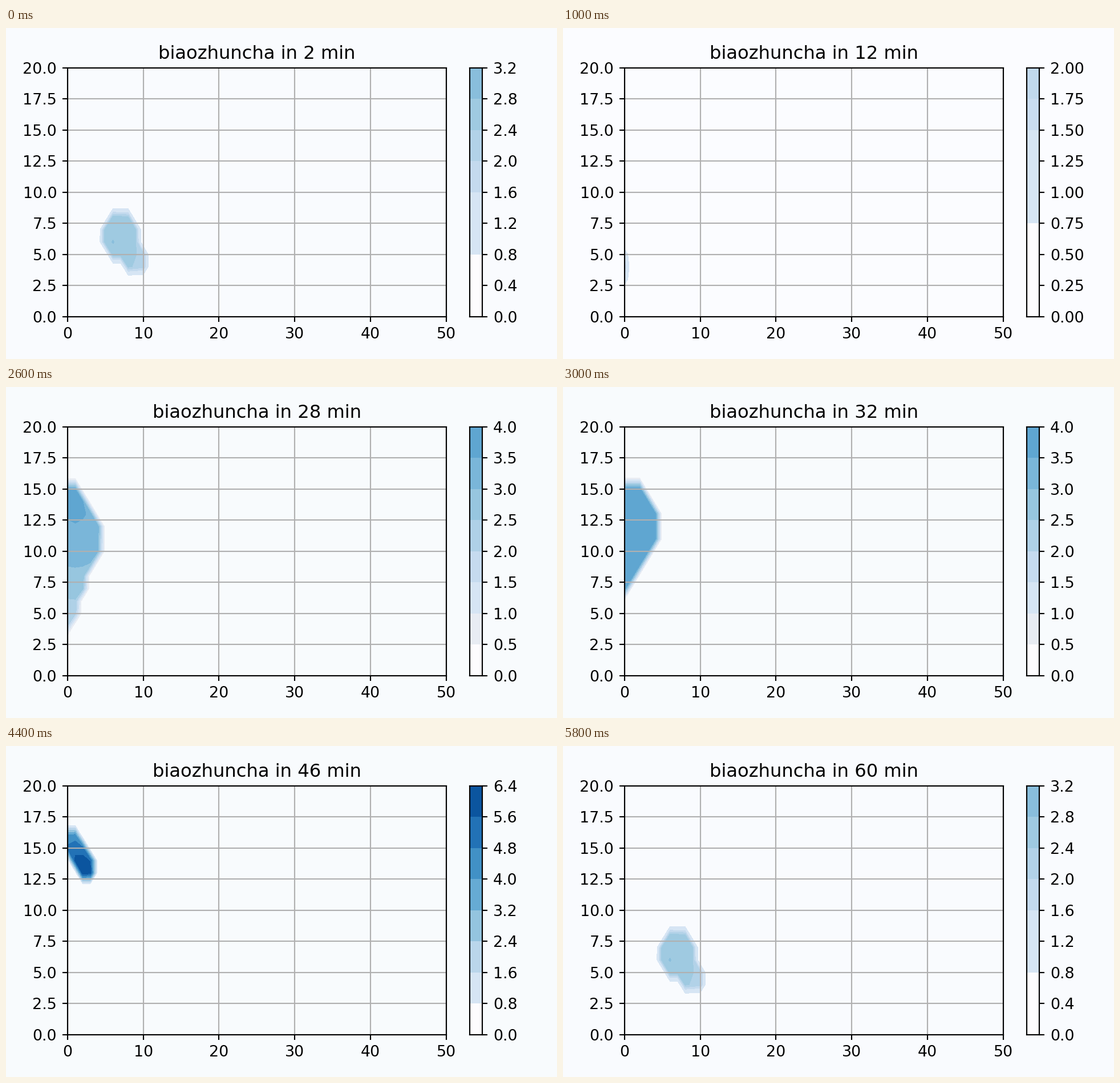
Write a matplotlib script that moves like this. It is 966x580 px and loops after 6000 ms.

```python
import numpy as np
import matplotlib.pyplot as plt
from matplotlib.animation import FuncAnimation
from matplotlib.path import Path
from matplotlib.ticker import MaxNLocator

W, H, DPI = 966, 580, 193.2
FRAMES, INTERVAL = 30, 200
VMAX = 7
blues = plt.get_cmap("Blues")

xs, ys = np.arange(51), np.arange(21)
grid = (xs[None, :] + 1j * ys[:, None]).ravel()


def ring(*corners):
    """Closed outline with an equal share of points on every edge."""
    n = len(corners)
    t = np.arange(360) * n / 360
    return np.interp(t, np.arange(n + 1), corners + corners[:1])


# Each cloud: outline clockwise from top left, hot spot, falloff around it.
start = (ring(6+8j, 8+8j, 9+7j, 9+6j, 10+5j, 10+4j, 8+4j, 6+5j, 5+6j, 5+7j),
         6+6j, 0.025)
wisp = ring(-1+5j, 5j, 4j, 3j, -1+3j), 4j, 0.3
drift = ring(-1+9j, 9j, 2+8j, 2+5j, 3j, -1+3j), 8j, 0.04
tall = (ring(-1+15j, 1+15j, 4+12j, 4+10j, 2+8j, 2+7j, 1+6j, 1+5j, 4j, -1+4j),
        1+14j, 0.014)
wide = (ring(-1+17j, 3+17j, 5+15j, 5+13j, 4+12j, 3+12j, 2+11j, 1+11j, 10j, -1+10j),
        1+14j, -0.019)
dense = ring(16j, 1+16j, 3+14j, 3+13j, 2+13j, 15j), 1.5+12.4j, 0.045

KEYS = [0, 5, 9, 13, 18, 22, 29]
CLOUDS = [start, wisp, drift, tall, wide, dense, start]
PEAK_KEYS = [0, 5, 9, 13, 18, 22, 23, 29]
PEAKS = [2.81, 1.87, 3.05, 3.62, 4.5, 6.3, 6.75, 2.81]


def field(i):
    k = min(np.searchsorted(KEYS, i, side="right") - 1, len(KEYS) - 2)
    u = (i - KEYS[k]) / (KEYS[k + 1] - KEYS[k])
    edge, hot, fall = ((1 - u) * a + u * b for a, b in zip(CLOUDS[k], CLOUDS[k + 1]))

    outline = Path(np.column_stack([edge.real, edge.imag]))
    inside = outline.contains_points(np.column_stack([grid.real, grid.imag]))
    inside |= abs(grid[:, None] - edge).min(axis=1) < 0.05

    heat = np.maximum(1 - fall * abs(grid - hot) ** 1.5, 0.3)
    z = np.where(inside, heat, 0)
    peak = np.interp(i, PEAK_KEYS, PEAKS)
    return (z * peak / z.max()).reshape(len(ys), len(xs)), peak


def backdrop(top):
    pale, cool = np.array([251, 252, 255]), np.array([248, 251, 253])
    u = np.clip((top - 2) / 2, 0, 1)
    return tuple((pale + (cool - pale) * u) / 255)


def tone(mid, base):
    if mid < 0.7:
        return base
    if mid < 0.8:
        return "#e8ecf3"
    if mid < 1.55:
        return "#d6e5f4"
    return blues(mid / VMAX)


def place(left, right, top=70, bottom=505.6):
    return [left / W, 1 - bottom / H, (right - left) / W, (bottom - top) / H]


fig = plt.figure(figsize=(W / DPI, H / DPI), dpi=DPI, facecolor=backdrop(3.2))
ax = fig.add_axes(place(108, 771.6))
bar = fig.add_axes(place(813, 835))


def draw(i):
    z, peak = field(i)
    levels = MaxNLocator(8, min_n_ticks=1).tick_values(0, peak)
    levels = levels[:np.searchsorted(levels, peak) + 1]
    mids = (levels[:-1] + levels[1:]) / 2
    base = backdrop(levels[-1])
    fig.set_facecolor(base)

    ax.clear()
    ax.set_facecolor(base)
    ax.contourf(xs, ys, z, levels=levels, colors=[tone(m, base) for m in mids])
    ax.set(xlim=(0, 50), ylim=(0, 20))
    ax.set_yticks(np.arange(0, 20.1, 2.5))
    ax.grid(True)
    ax.set_title(f"biaozhuncha in {2 * (i + 1)} min")

    bar.clear()
    for lo, hi, m in zip(levels, levels[1:], mids):
        bar.axhspan(lo, hi, facecolor=tone(m, "#fdfcfe"), edgecolor="none", lw=0)
    bar.set(xlim=(0, 1), ylim=(0, levels[-1]), xticks=[])
    bar.yaxis.tick_right()
    bar.set_yticks(levels)
    return []


anim = FuncAnimation(fig, draw, frames=FRAMES, interval=INTERVAL,
                     init_func=lambda: draw(0), repeat=True)
plt.show()
```
